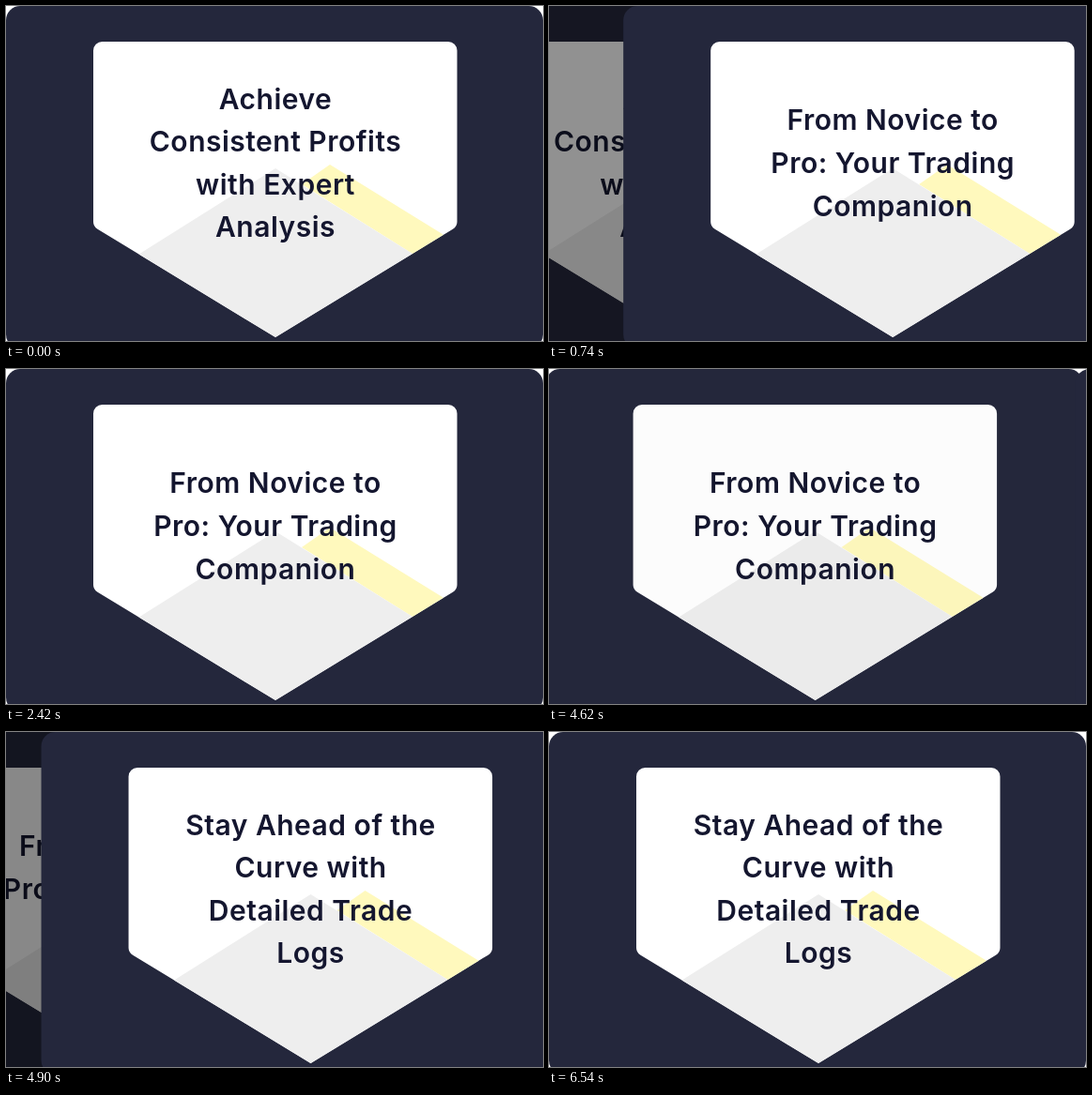
An HTML page that plays this animation: 572x357 px, repeating every 8000 ms.

```html
<!DOCTYPE html>
<html lang="en">
<head>
<meta charset="utf-8">
<title>Sliding cards</title>
<style>
  html, body { margin: 0; width: 100%; height: 100%; overflow: hidden; background: #fff; }
  #stage { position: relative; width: 572px; height: 357px; overflow: hidden; }
  .slide {
    position: absolute; left: 0; top: 0; width: 572px; height: 365px;
    border-radius: 15px; background: #24273c; visibility: hidden;
  }
  .slide svg { position: absolute; left: 0; top: 0; }
  .shade { position: absolute; inset: 0; border-radius: inherit; background: #000; opacity: 0; }
  text {
    font: 600 30px Inter, "Noto Sans", sans-serif;
    letter-spacing: .5px; text-anchor: middle; fill: #14162f;
  }
</style>
</head>
<body>
<div id="stage"></div>
<script>
const WIDTH = 572, LOOP = 8000, LINE = 45.6, MIDDLE = 178;
const STARTS = [481, 4600];   // when each slide change begins
const SETTLE = 1935;          // the covered slide is dropped after this
const BACK_SHIFT = 0.3, BACK_SHADE = 0.5;

const titles = [
  ['Achieve', 'Consistent Profits', 'with Expert', 'Analysis'],
  ['From Novice to', 'Pro: Your Trading', 'Companion'],
  ['Stay Ahead of the', 'Curve with', 'Detailed Trade', 'Logs'],
];

const card = `
  <path fill="#fff" d="M102.5 38H471a9.5 9.5 0 0 1 9.5 9.5V230q0 5-4.5 7.7L287 353
    97.5 237.7Q93 235 93 230V47.5a9.5 9.5 0 0 1 9.5-9.5Z"/>
  <path fill="#fff9bd" d="M345 169 466 243.8 433 264 315 190Z"/>
  <path fill="#eee" d="M287 173 433 264 287 353 141.5 264.5Z"/>`;

function makeSlide(lines) {
  const slide = document.createElement('div');
  const top = MIDDLE - (lines.length - 1) * LINE / 2;
  const text = lines.map((line, i) =>
    `<text x="287" y="${top + i * LINE}">${line}</text>`).join('');
  slide.className = 'slide';
  slide.innerHTML = `<svg width="572" height="357">${card}${text}</svg><div class="shade"></div>`;
  document.getElementById('stage').append(slide);
  return slide;
}

const slides = titles.map(makeSlide);

// Unit spring: stiffness 100, damping 15, mass 1
function spring(ms) {
  const t = ms / 1000, decay = 7.5, freq = Math.sqrt(100 - decay * decay);
  return 1 - Math.exp(-decay * t) * (Math.cos(freq * t) + decay / freq * Math.sin(freq * t));
}

function place(slide, x, shade) {
  slide.style.visibility = 'visible';
  slide.style.transform = `translateX(${x}px)`;
  slide.lastChild.style.opacity = shade;
}

function render(now) {
  const time = now % LOOP;
  const current = STARTS.filter(start => time >= start).length;
  const elapsed = current ? time - STARTS[current - 1] : SETTLE;
  slides.forEach(slide => slide.style.visibility = 'hidden');
  if (elapsed < SETTLE) {
    const p = spring(elapsed);
    place(slides[current - 1], -WIDTH * BACK_SHIFT * p, BACK_SHADE * p);
    place(slides[current], WIDTH * (1 - p), 0);
  } else {
    place(slides[current], 0, 0);
  }
}

const origin = performance.now();
function tick() {
  render(performance.now() - origin);
  requestAnimationFrame(tick);
}
tick();
</script>
</body>
</html>
```
